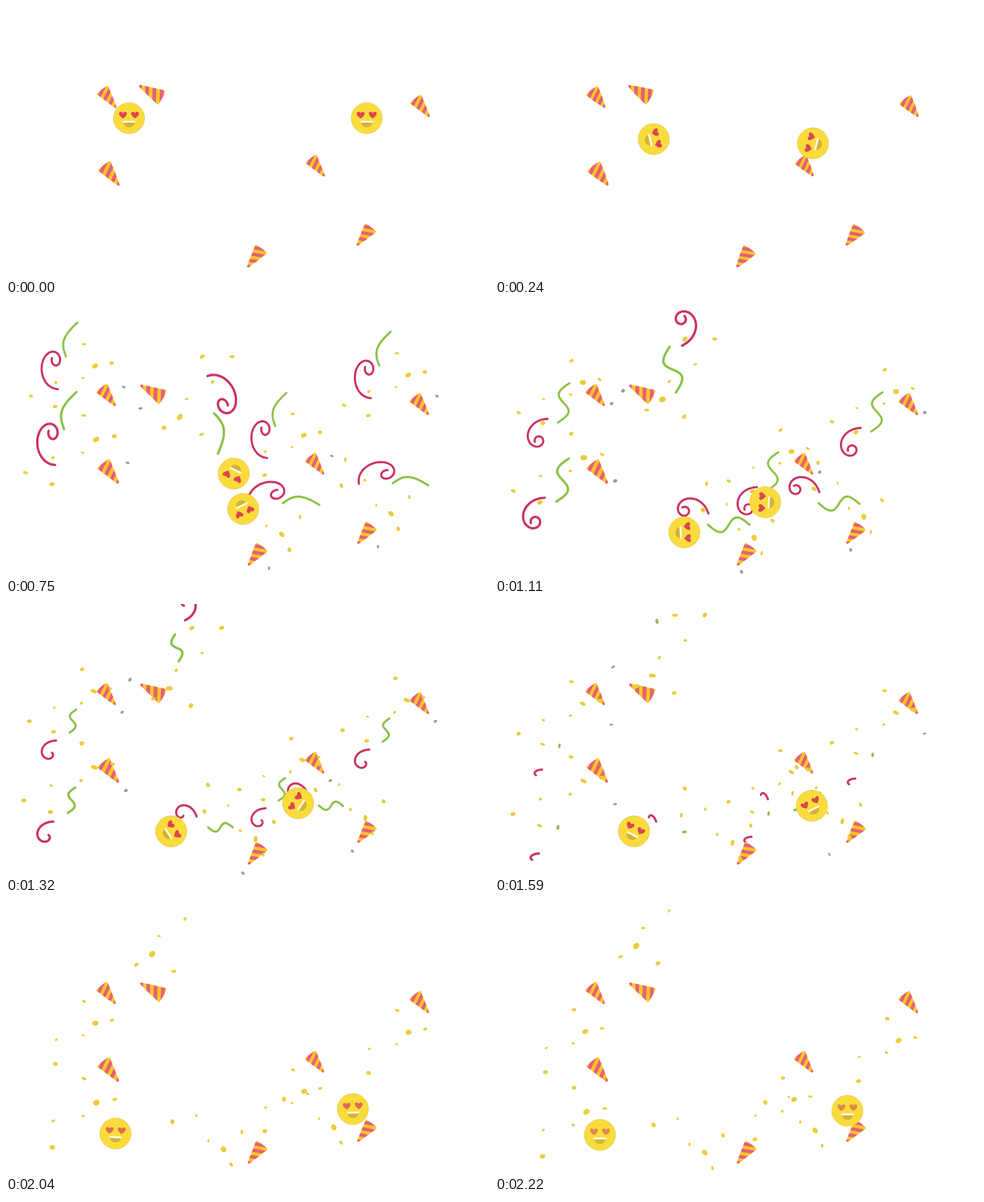
An HTML page for the animation above (2250 ms loop, 640 px wide and 360 px high).

```html
<!DOCTYPE html>
<html lang="en">
<head>
<meta charset="utf-8">
<title>Party poppers</title>
<style>
html, body { margin: 0; width: 100%; height: 100%; overflow: hidden; background: #fff; }
svg { display: block; width: 100vw; height: 100vh; }
</style>
</head>
<body>
<svg viewBox="0 0 640 360">
  <defs>
    <clipPath id="cut"><path id="cone"/></clipPath>
    <g id="popper">
      <g id="body" transform="rotate(-37.5)">
        <g clip-path="url(#cut)">
          <rect x="-20" y="-40" width="40" height="44" fill="#fdc526"/>
          <path id="stripes" stroke="#e4607a" stroke-width="4.4"/>
        </g>
      </g>
      <g fill="none" stroke-width="2.8" stroke-linecap="round" stroke-linejoin="round">
        <path id="green" stroke="#8cc047"/>
        <path id="red" stroke="#cb325f"/>
      </g>
      <g id="bits"/>
    </g>
    <g id="face">
      <circle r="20.6" fill="#f9dc3c" stroke="#e6cc58" stroke-width=".8"/>
      <g id="eyes">
        <path id="heart" transform="translate(-8 -4.3)" d="M0 4.8C-3 2.3-5.2.5-5.2-1.8C-5.2-4.6-1.3-5 0-2.3C1.3-5 5.2-4.6 5.2-1.8C5.2.5 3 2.3 0 4.8Z"/>
        <use href="#heart" x="16"/>
      </g>
      <path d="M-7.6 5H7.6C7 9.5 4 12 0 12S-7 9.5-7.6 5Z" fill="#d3b23a"/>
      <rect x="-8.3" y="3.6" width="16.6" height="2.5" rx="1" fill="#fffbe6"/>
    </g>
  </defs>
  <g id="poppers"></g>
  <use id="ballR" href="#face"/>
  <use id="ballL" href="#face"/>
</svg>
<script>
const LOOP = 2250, STEP = 30, POP = 510, OPEN = 750, CURL = 1110;
const NS = 'http://www.w3.org/2000/svg';
const { sin, cos, PI } = Math;
const $ = id => document.getElementById(id);
const mix = (a, b, k) => a + (b - a) * k;
const phase = (t, from, to) => Math.max(0, Math.min(1, (t - from) / (to - from)));
const easeOut = (k, power) => 1 - (1 - k) ** power;
const set = (el, attrs) => { for (const n in attrs) el.setAttribute(n, attrs[n]); };
const show = on => on ? 'visible' : 'hidden';
function add(parent, tag, attrs) {
  const el = document.createElementNS(NS, tag);
  set(el, attrs);
  return parent.appendChild(el);
}

// One popper is animated; the others are turned copies: tip x, tip y, turn, scale.
const places = [
  [145, 134, 0, 1], [178, 106.5, 156, 1.13], [149, 237, 0, 1.1], [421, 225, 0, .98],
  [560, 146, 0, 1], [466, 317, 75, 1], [321, 346, 74, 1.02]
];
for (const [x, y, turn, size] of places) {
  add($('poppers'), 'use', {
    href: '#popper', transform: `translate(${x} ${y}) rotate(${turn}) scale(${size})`
  });
}

// Everything leaves the mouth of the cone at the pop.
const fly = (x, y, t) => {
  const k = easeOut(phase(t, POP, POP + 90), 3);
  return [mix(-18, x, k), mix(-24, y, k)];
};

// Confetti: x, y once open, radius. The last two fade early.
const spots = [
  [-42, -82, 2.9], [-27, -53, 4], [-5, -57, 2.9], [-43, -37, 2.2], [-80, 1, 3.2],
  [-79, -31, 2.2], [-112, -13, 3], [11, -25, 2.4]
];
const bits = spots.map(([x, y, size], i) => ({
  x, y, size,
  until: i < 6 ? LOOP : 1800,
  el: add($('bits'), 'ellipse', { fill: x > 0 ? '#9b9a96' : '#e9cd38' })
}));

function drawBits(t) {
  const k = (t - OPEN) / (LOOP - OPEN);
  bits.forEach(({ x, y, size, until, el }, i) => {
    const sway = 2 * k - 3 * sin(PI * Math.max(0, k));
    const at = fly(x + sway, y + .061 * (t - OPEN), t);
    set(el, {
      rx: size, ry: size * (.68 + .15 * sin(t / 170 + i * 2)),
      transform: `translate(${at}) rotate(${30 * sin(t / 240 + i * 1.7)})`,
      visibility: show(t > POP && t < until)
    });
  });
}

function ribbon(id, t, end, from, point) {
  const pts = [], n = 48;
  for (let i = 0; i <= n; i++) pts.push(fly(...point(mix(from, 1, i / n)), t));
  set($(id), { d: 'M' + pts.join('L'), visibility: show(t > POP && t < end) });
}

// An arc that bends into a wave, then shrinks away.
function drawGreen(t) {
  const end = 1620, m = phase(t, OPEN, CURL), n = phase(t, CURL, end);
  const x = mix(mix(-58, -54, m), -60, n), y = mix(mix(-88, -4, m), 58, n);
  ribbon('green', t, end, 0, s => {
    const wave = sin(PI * s * (1 + m));
    return [
      x + (1 - n) * (15 * (.5 - s) - 10 * wave),
      y + (1 - n) * mix(45, 52, m) * (s - .5)
    ];
  });
}

// A spiral that flips over vertically while it falls, then unrolls to a dash.
function drawRed(t) {
  const end = 1650, m = phase(t, OPEN, CURL), n = phase(t, CURL, end);
  const x = mix(-79, -87, m), y = mix(mix(-61, 46, m), 98, n);
  const wide = mix(1, .3, n), tall = mix(mix(-1.35, 1, m), .12, n);
  ribbon('red', t, end, .8 * n, s => {
    const r = 5.5 + 25.5 * s ** 4.5, a = mix(-200, 292, s) * PI / 180;
    const lean = 9 * (1 - m) * s ** 4;
    return [x + wide * (r * cos(a) - lean), y + tall * r * sin(a)];
  });
}

function drawCone(t) {
  const wound = t <= POP;
  const q = wound ? (t / POP) ** 2 : 1 - phase(t, POP, POP + 90);
  const len = 30 - 6.5 * q, half = 9.4 + 2 * q, bulge = half * .5 + .8 + 3.4 * q;
  set($('cone'), {
    d: `M-1 0Q${-bulge} ${-len * .5} ${-half} ${-len}Q0 ${-len - 2 - 2 * q} ${half} ${-len}`
      + `Q${bulge} ${-len * .5} 1 0Z`
  });
  let d = '';
  for (let i = 0; i < 5; i++) {
    const y = -(1 + 9.6 * i) * len / 30;
    d += `M-16 ${y + 8}L16 ${y - 8}`;
  }
  set($('stripes'), { d });
  set($('body'), { transform: `rotate(-37.5) translate(0 ${wound ? 1.5 * (1 - q) : 0})` });
}

// Heights of the two balls: time, left, right.
const drops = [
  [0, 149, 149], [POP, 208, 220], [OPEN, 224, 271], [CURL, 262, 302], [1590, 268, 302],
  [2220, 276, 308]
];
function height(t, c) {
  const i = Math.max(1, drops.findIndex(d => t <= d[0]));
  const a = drops[i - 1], b = drops[i];
  return mix(a[c], b[c], phase(t, a[0], b[0]));
}

function drawBalls(t) {
  const u = phase(t, 0, 2220), turn = 360 * easeOut(u, 2.05);
  const put = (id, x, y, r) => set($(id), { transform: `translate(${x} ${y}) rotate(${r})` });
  put('ballL', mix(163, 467, easeOut(u, 1.48)), height(t, 1), turn);
  put('ballR', mix(478, 139, easeOut(u, 1.6)), height(t, 2), -turn);
  set($('eyes'), { fill: `rgb(221 ${mix(70, 136, phase(t, 1800, 2220))} 80)` });
}

function tick() {
  const t = Math.floor(performance.now() % LOOP / STEP) * STEP;
  for (const draw of [drawCone, drawGreen, drawRed, drawBits, drawBalls]) draw(t);
  requestAnimationFrame(tick);
}
tick();
</script>
</body>
</html>
```
